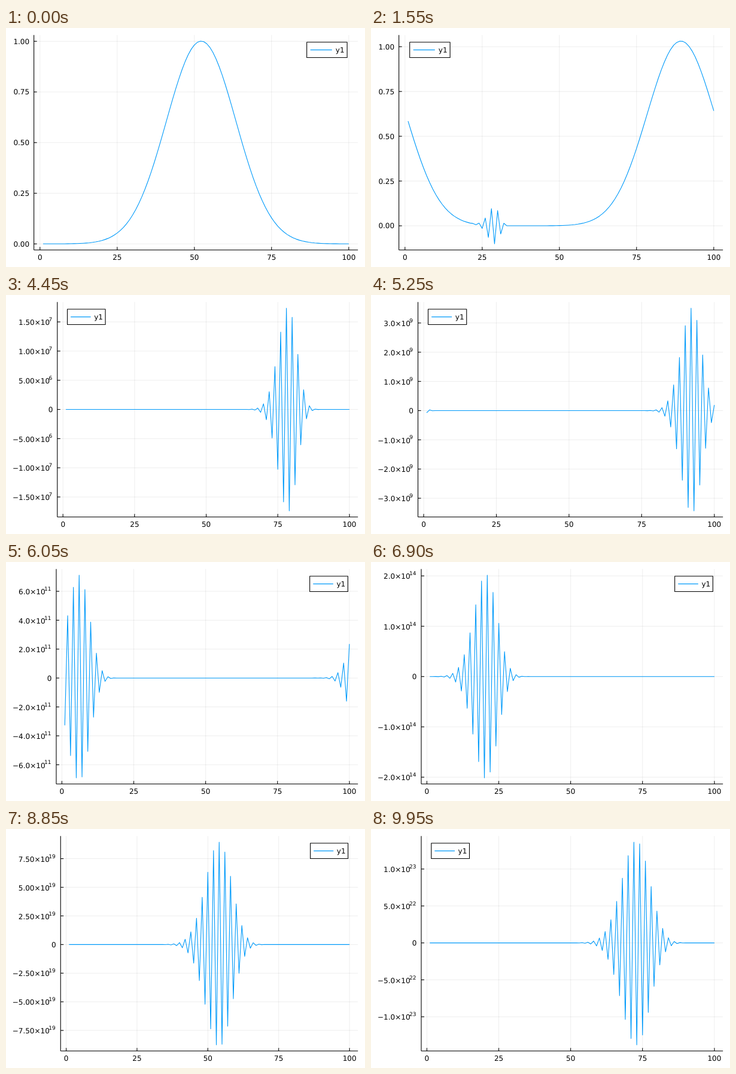
Recreate the animation shown at these times as an HTML page with a canvas. Size 600x400 px, loop 10 s.

```html
<!DOCTYPE html>
<html lang="en">
<head>
<meta charset="utf-8">
<title>Unstable upwind advection</title>
<style>
html, body { margin: 0; width: 100%; height: 100%; overflow: hidden; background: #fff; }
canvas { display: block; width: 600px; height: 400px; }
</style>
</head>
<body>
<canvas id="plot" width="600" height="400"></canvas>
<script>
const ctx = document.getElementById('plot').getContext('2d');
const N = 100, STEPS = 200, STEP_MS = 50, COURANT = 1.2;
const TOP = 11.8, BOTTOM = 371.5, RIGHT = 588.2, PAD = 0.03;
const FONT = '"DejaVu Sans", sans-serif', SIZE = 12, SUP = 9;
const BLUE = '#009afa';

// Periodic upwind scheme; a Courant number above 1 makes it blow up.
function simulate() {
  let u = Array.from({ length: N }, (_, i) => Math.exp(-((2 * Math.PI * i / N - Math.PI) ** 2)));
  const states = [];
  for (let n = 0; n < STEPS; n++) {
    const prev = u;
    u = prev.map((v, i) => v - COURANT * (v - prev[(i + N - 1) % N]));
    states.push(u);
  }
  return states;
}

function widen(lo, hi) {
  const d = (hi - lo) * PAD;
  return [lo - d, hi + d];
}

// Pick the step with the best mix of tick count, coverage and niceness.
const NICENESS = [[5, 0.9], [3, 0.2], [2.5, 0.5], [2, 0.7], [1, 1]];
function findTicks([lo, hi]) {
  const span = hi - lo, mag = Math.floor(Math.log10(span));
  let best = -Infinity, ticks = [];
  for (const z of [mag, mag - 1]) {
    for (const [q, nice] of NICENESS) {
      const step = q * 10 ** z;
      const a = Math.ceil(lo / step), b = Math.floor(hi / step), count = b - a + 1;
      if (count < 4 || count > 8) continue;
      const score = (1 - Math.abs(count - 5) / 5) / 4 + span / ((count - 1) * step) / 2 + nice / 4;
      if (score > best + 1e-9) {
        best = score;
        ticks = Array.from({ length: count }, (_, i) => (a + i) * step);
      }
    }
  }
  return ticks;
}

const decimals = v => (String(v).split('.')[1] || '').length;
const minus = s => s.replace('-', '\u2212');

// Each label is { main, sup }.
function makeLabels(ticks) {
  const range = ticks[ticks.length - 1] - ticks[0];
  if (Math.abs(Math.log10(range)) <= 4 + 1e-9) {
    const d = Math.max(...ticks.map(v => decimals(+v.toPrecision(6))));
    return ticks.map(v => ({ main: minus((v || 0).toFixed(d)), sup: '' }));
  }
  const d = 1 + Math.max(...ticks.map(v => decimals(+v.toExponential(6).split('e')[0])));
  return ticks.map(v => {
    if (v === 0) return { main: '0', sup: '' };
    const [m, e] = v.toExponential(d).split('e');
    return { main: minus(m) + '\u00d710', sup: String(+e) };
  });
}

function ems(s) {
  ctx.font = `100px ${FONT}`;
  return ctx.measureText(s).width / 100;
}

// Corner with the least data near it; ties go to the top right, then top left.
function legendCorner(u, xl, yl) {
  let best = null;
  for (const [cx, cy] of [[1, 1], [0, 1], [1, 0], [0, 0]]) {
    let load = 0;
    u.forEach((v, i) => {
      const dx = Math.abs((i + 1 - xl[0]) / (xl[1] - xl[0]) - cx);
      const dy = Math.abs((v - yl[0]) / (yl[1] - yl[0]) - cy);
      if (dx <= 0.25 && dy <= 0.25) load += 1 / (1 + 100 * (dx * dx + dy * dy));
    });
    if (!best || load < best.load - 1e-9) best = { cx, cy, load };
  }
  return best;
}

function stroke(color, width, points) {
  ctx.strokeStyle = color;
  ctx.lineWidth = width;
  ctx.beginPath();
  points.forEach(([x, y], i) => i ? ctx.lineTo(x, y) : ctx.moveTo(x, y));
  ctx.stroke();
}

function text(s, x, y, align, size = SIZE) {
  ctx.font = `${size}px ${FONT}`;
  ctx.textAlign = align;
  ctx.fillStyle = '#000';
  ctx.fillText(s, x, y);
}

function drawLegend(u, xl, yl, left) {
  const w = RIGHT - left, unit = w / 90, boxW = 13.3 + w / 10, boxH = 25.7, gap = 12;
  const { cx, cy } = legendCorner(u, xl, yl);
  const x = cx ? RIGHT - w / 30 - boxW : left + w / 30;
  const y = cy ? TOP + gap : BOTTOM - gap - boxH;
  const mid = y + boxH / 2;
  ctx.fillStyle = '#fff';
  ctx.fillRect(x, y, boxW, boxH);
  ctx.strokeStyle = '#000';
  ctx.lineWidth = 1.1;
  ctx.strokeRect(x, y, boxW, boxH);
  stroke(BLUE, 1.1, [[x + unit, mid], [x + 7 * unit, mid]]);
  text('y1', x + 8 * unit, mid + 4.4, 'left');
}

function draw(u) {
  const xl = widen(1, N), yl = widen(Math.min(...u), Math.max(...u));
  const xt = findTicks(xl), yt = findTicks(yl);
  const labels = makeLabels(yt);
  const left = 21.2 + Math.max(...labels.map(l => 11.42 * ems(l.main) + 8.6 * ems(l.sup)));
  const px = x => left + (x - xl[0]) / (xl[1] - xl[0]) * (RIGHT - left);
  const py = y => BOTTOM - (y - yl[0]) / (yl[1] - yl[0]) * (BOTTOM - TOP);

  ctx.fillStyle = '#fff';
  ctx.fillRect(0, 0, 600, 400);

  const faint = 'rgba(0,0,0,0.1)';
  xt.forEach(v => stroke(faint, 0.7, [[px(v), TOP], [px(v), BOTTOM]]));
  yt.forEach(v => stroke(faint, 0.7, [[left, py(v)], [RIGHT, py(v)]]));

  stroke('#000', 1.1, [[left, TOP], [left, BOTTOM]]);
  stroke('#000', 1.1, [[left, BOTTOM], [RIGHT, BOTTOM]]);

  xt.forEach(v => {
    stroke('#000', 1.1, [[px(v), BOTTOM], [px(v), BOTTOM - 5]]);
    text(String(v), px(v), 387.8, 'center');
  });
  yt.forEach((v, i) => {
    const y = py(v), { main, sup } = labels[i];
    stroke('#000', 1.1, [[left, y], [left + 5, y]]);
    if (sup) {
      const end = left - 8.6;
      text(sup, end, y - 0.9, 'right', SUP);
      text(main, end - SUP * ems(sup) + 1.6, y + 5.2, 'right');
    } else {
      text(main, left - 7.5, y + 4.4, 'right');
    }
  });

  stroke(BLUE, 1.1, u.map((v, i) => [px(i + 1), py(v)]));
  drawLegend(u, xl, yl, left);
}

ctx.lineJoin = 'round';
ctx.textRendering = 'geometricPrecision';
const states = simulate();
const start = performance.now();
let shown = -1;

function tick() {
  const k = Math.floor((performance.now() - start) / STEP_MS) % STEPS;
  if (k !== shown) draw(states[shown = k]);
  requestAnimationFrame(tick);
}
tick();
</script>
</body>
</html>
```
